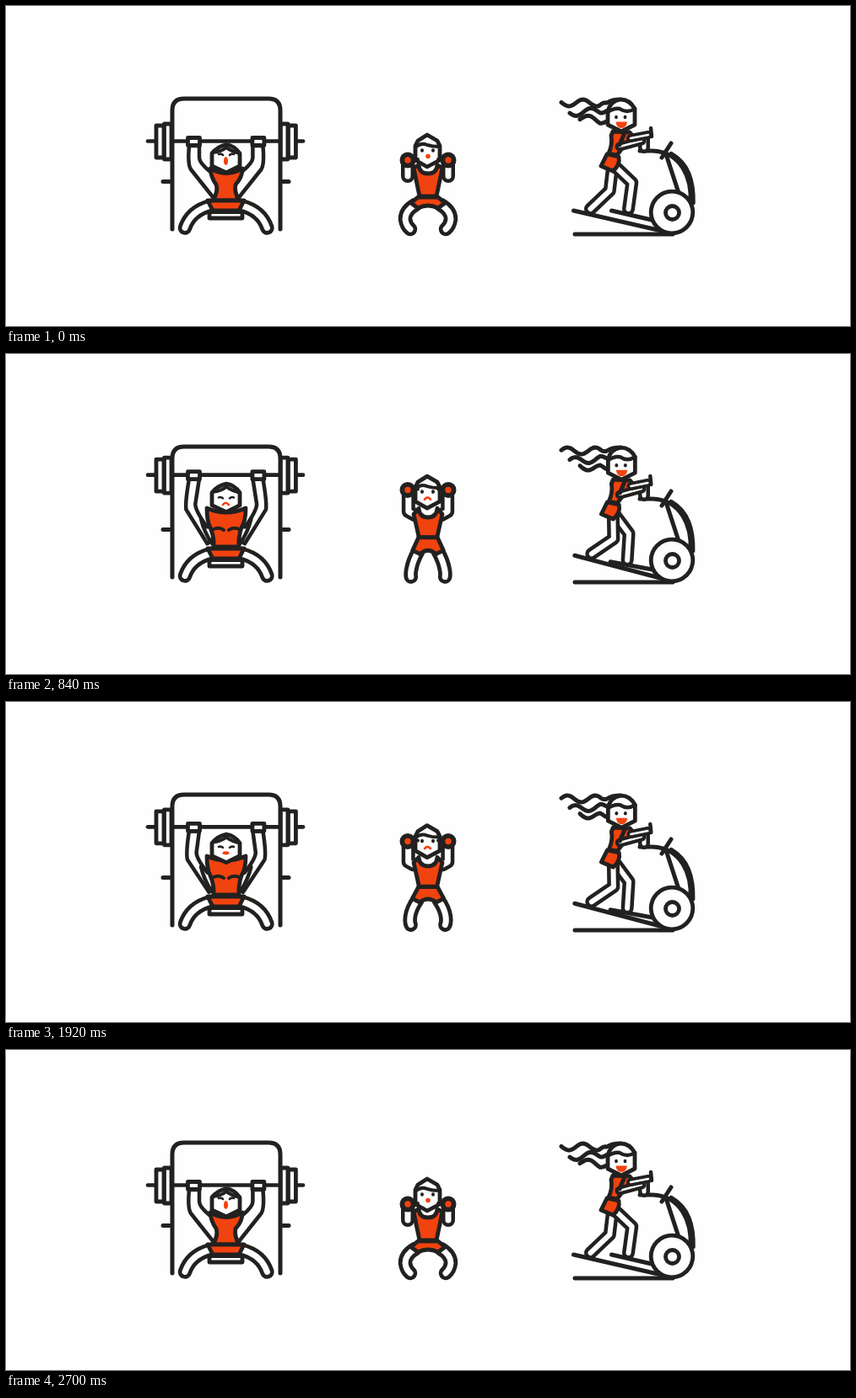
Animation of 1000 by 380 pixels, one loop 2.73 s. Source, as an HTML page with a canvas:

```html
<!DOCTYPE html>
<html lang="en">
<head>
<meta charset="utf-8">
<title>Workout</title>
<style>
html, body { margin: 0; width: 100%; height: 100%; overflow: hidden; background: #fefefe; }
canvas { display: block; }
</style>
</head>
<body>
<canvas id="stage" width="1000" height="380"></canvas>
<script>
const ctx = document.getElementById('stage').getContext('2d');
const INK = '#222120', RED = '#f1430f', WHITE = '#fefefe';
const TAU = Math.PI * 2;
ctx.lineCap = ctx.lineJoin = 'round';

// Blends two path strings of the same structure.
function mix(a, b, u) {
  const to = b.match(/-?[\d.]+/g);
  let i = 0;
  return a.replace(/-?[\d.]+/g, n => +n + (to[i++] - n) * u);
}
function ease(t, from, to) {
  const x = Math.min(1, Math.max(0, (t - from) / (to - from)));
  return x * x * (3 - 2 * x);
}
function line(d, width = 5, color = INK) {
  ctx.lineWidth = width;
  ctx.strokeStyle = color;
  ctx.stroke(new Path2D(d));
}
function shape(d, fill = WHITE, width = 4.8) {
  ctx.fillStyle = fill;
  ctx.fill(new Path2D(d));
  line(d, width);
}
function limb(d, outer = 16.5, inner = 7) {
  line(d, outer);
  line(d, inner, WHITE);
}
function oval(x, y, rx, ry, fill) {
  ctx.beginPath();
  ctx.ellipse(x, y, rx, ry, 0, 0, TAU);
  ctx.fillStyle = fill;
  ctx.fill();
}
function ring(x, y, outer, inner, fill) {
  oval(x, y, outer, outer, INK);
  oval(x, y, inner, inner, fill);
}
function box(x, y, w, h) {
  shape(`M${x} ${y}h${w}v${h}h${-w}z`);
}
function shifted(dx, dy, draw) {
  ctx.save();
  ctx.translate(dx, dy);
  draw();
  ctx.restore();
}
function bothSides(axis, draw) {
  draw();
  ctx.save();
  ctx.translate(2 * axis, 0);
  ctx.scale(-1, 1);
  draw();
  ctx.restore();
}

function benchPress(u) {
  const axis = 260.7, bar = 160.5 - 18 * u, open = Math.min(1, 2 * u);
  line('M197 265V124Q197 110 211 110H311Q325 110 325 124V265');
  line('M186 208.5H194M328 208.5H335');
  line(`M168 ${bar}H352`, 4.6);
  bothSides(axis, () => {
    box(178, bar - 18.5, 9, 38);
    box(187.5, bar - 20.5, 8.5, 42);
    limb('M243 237Q219 243 212 263.5');
    shape(mix('M217 166Q215 188 219 194L246 228L262 205L241 196Q229 186 229 180L229 166Z',
              'M217 147Q212 175 213 184L238 225L262 205L238 206Q224 186 224 178L229 147Z', u), WHITE, 4.5);
    if (open > .5) line('M231 196Q235 212 244 225', 4.5);
    box(215.5, bar - 4, 14, 9);
  });

  box(241, 244.5, 39, 7.5);
  shape(mix('M242 193Q243 204 249 212Q252 220 245 231H276Q270 220 272 212Q280 204 280 193Q261 204 242 193Z',
            'M238 183Q238 199 242 206Q247 218 246 229H276Q275 218 279 206Q284 199 284 183Q261 193 238 183Z', open), RED);
  if (open > .5) line('M246 208Q253 205 258 209M264 209Q269 205 276 208', 4);
  shape('M239 231H282L276 243H245Z', RED);

  shifted(0, -11 * u, () => {
    shape('M244 175V190L261 198L277 190V175Q271 166 261 164.5Q250 167 244 175Z');
    line('M245 174Q255 173 261 168Q268 173 277 175', 4);
  });
  const eyeY = 176 - 6 * u;
  line(`M252 ${eyeY}q3 -1 5 1M265 ${eyeY + 1}q2 -2 5 -1`, 2.6);
  if (u > .85) line('M257 179Q260 174.5 264 179', 2.6, RED);
  else oval(260.5, 184 - 7 * u, 2.5 + 1.5 * open, 4.8 - 2.8 * open, RED);
}

function dumbbells(u) {
  const axis = 500, hand = 183 - 26 * u;
  bothSides(axis, () => {
    limb(mix('M485 236Q473 243 473 253Q474 261 479 265',
             'M489 234Q484 246 482 255Q480 261 480 264.5', u));
    limb(mix('M476 188L476 202L476 202', 'M477 163L477 184L486 189', u), 16, 7);
  });
  shape(mix('M483 192L489 189Q490 199 500 199Q510 199 511 189L517 192Q513 212 510 226H490Q487 212 483 192Z',
            'M483 190L489 182Q490 193 500 193Q510 193 511 182L517 190Q513 206 511 216H489Q487 206 483 190Z', u), RED);
  shape(mix('M488 227H512L520 234L512 240Q500 234 488 240L480 234Z',
            'M489 216H511L518 233L509 237Q500 228 491 237L482 233Z', u), RED);
  shifted(0, -9.5 * u, () => {
    shape('M499 153L511 160L514 166V183L499 191L485 183V166L488 160Z');
    line('M486 167Q492 162 499 165Q505 167 513 167', 4);
    oval(493, 171.5, 2, 2.3, INK);
    oval(506, 171.5, 2, 2.3, INK);
    if (u > .5) line('M496 180.5Q499.5 176 503 180.5', 2.6, RED);
    else oval(500, 178.5 + 15 * u, 2.8, 2.8 + 10 * Math.min(u, .1), RED);
  });
  bothSides(axis, () => {
    line(`M484 ${hand - 1}h4`, 4);
    ring(476, hand, 9.5, 3.7, RED);
  });
}

function leg(hip, foot) {
  const dx = foot.x - hip.x, dy = foot.y - hip.y, d = Math.hypot(dx, dy);
  const bend = Math.sqrt(Math.max(4, 31.5 ** 2 - d * d / 4));
  const kx = (hip.x + foot.x) / 2 + bend * dy / d, ky = (hip.y + foot.y) / 2 - bend * dx / d;
  limb(`M${hip.x} ${hip.y}L${kx} ${ky}L${foot.x} ${foot.y}`, 15, 6);
}

// A lock of hair: a wave running to the tail, fading out at the head.
function strand(x0, y0, x1, y1, low, turn, end = '') {
  let d = '';
  for (let x = x0; x <= x1; x += 2) {
    const amp = 4 * Math.min(1, (x1 - x) / 9);
    const y = y0 + (y1 - y0) * (x - x0) / (x1 - x0) + amp * Math.cos(TAU * (x - low) / 33 + turn);
    d += (d ? 'L' : 'M') + x + ' ' + y;
  }
  line(d + end);
}

function elliptical(t) {
  const turn = TAU * t / 540;
  const reach = (1 + Math.cos(2 * turn)) / 2, lean = 3 * (1 - reach);
  const pedals = [Math.PI, 0].map(side => ({
    x: 695 + 22.5 * Math.cos(turn + side),
    y: 243 + 11 * Math.sin(turn + side),
    crankX: 788 + 7 * Math.cos(turn + side),
    crankY: 264.5 - 3.5 * Math.cos(turn + side)
  }));

  // Machine
  line('M674 271H790');
  for (const p of pedals) line(`M${p.x} ${p.y}L${p.crankX} ${p.crankY}`);
  line('M751 172H766C800 173 813 205 811 234');
  line(`M788 175C${806 + 3 * reach} 187 ${812 + 3 * reach} 208 ${811.5 + 3 * reach} 234`, 4.5);
  line('M782 176L797 222M788 163L777 180');
  ring(789, 245, 27.2, 22.4, WHITE);
  ring(789.5, 245.5, 10.4, 5.6, WHITE);
  limb('M756 168V157', 14, 5);

  // Body
  const hip = { x: 719 + lean, y: 188 };
  for (const p of pedals) leg(hip, { x: p.x + 20, y: p.y - 2 });
  shifted(lean, 0, () => {
    shape('M719 149L739 150L746 158L733 165L724 177L714 175Q719 164 717 154Z', RED);
    shape('M712 176L726 179Q728 189 719 196L705 190Z', RED);
    limb(`M727 167L${750 + 3 * reach} 160`, 11, 2.5);
    line('M732 153L727 165');
  });
  limb(`M${740 + lean} 157L${756 + 5 * reach} 153`, 10, 2.5);
  line(`M${758 + 6 * reach} 145l1 10`, 4.5);

  // Hair and head
  strand(658, 115, 712, 115, 667, turn, `Q718 111 ${728 + lean} 111`);
  strand(668, 127, 713, 124, 676, turn);
  strand(680, 133, 713, 137, 674, turn);
  shifted(lean, lean * .5, () => {
    shape('M713 126Q715 113 728 111Q739 111 745 122V141L729 149L713 141Z');
    line('M713 126Q720 121 727 122Q736 128 745 122', 4.5);
    oval(723, 132, 1.9, 2.3, INK);
    oval(733.5, 132, 1.9, 2.3, INK);
    ctx.fillStyle = RED;
    ctx.fill(new Path2D('M722.5 137.5H736Q735 145 729 145Q723.5 145 722.5 137.5Z'));
  });
}

function draw(now) {
  const t = Math.floor(now % 2730 / 30) * 30;
  const drop = ease(t, 1800, 2115);
  ctx.fillStyle = WHITE;
  ctx.fillRect(0, 0, 1000, 380);
  benchPress(ease(t, 180, 960) - drop);
  dumbbells(ease(t, 500, 960) - drop);
  elliptical(t);
  requestAnimationFrame(draw);
}
requestAnimationFrame(draw);
</script>
</body>
</html>
```
